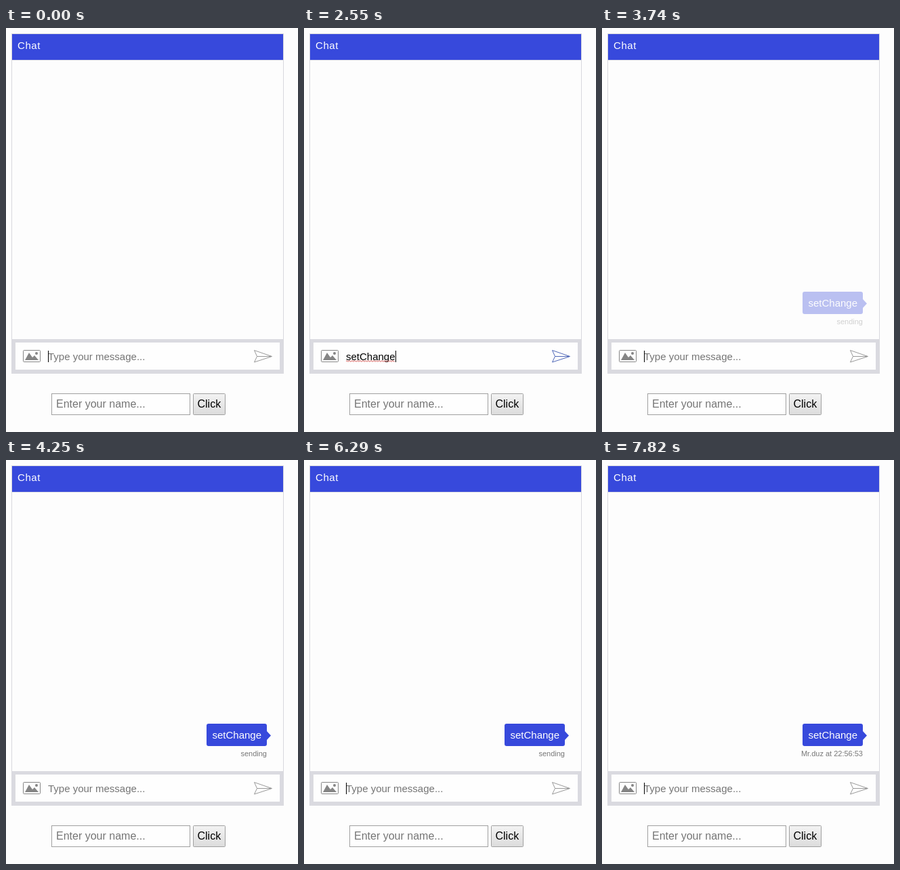
These frames come from a looping animation (431x596 px, 7.99 s). An HTML page:

```html
<!DOCTYPE html>
<html lang="en">
<head>
<meta charset="utf-8">
<title>Chat</title>
<style>
  html, body { margin: 0; width: 100%; height: 100%; overflow: hidden; background: #fdfdfd; }
  svg { display: block; width: 431px; height: 596px; font: 15px "Liberation Sans", Arial, sans-serif; }
  .line { fill: none; stroke-width: 1; }
  .hint { fill: #757575; }
  .field { font-size: 16px; }
</style>
</head>
<body>
<svg viewBox="0 0 431 596">
  <defs>
    <linearGradient id="face" x2="0" y2="1">
      <stop stop-color="#f3f3f3"/>
      <stop offset="1" stop-color="#dcdcdc"/>
    </linearGradient>
  </defs>

  <rect class="line" x="8.5" y="8.5" width="401" height="501" stroke="#d8d8de"/>
  <rect x="9" y="9" width="400" height="38" fill="#3749dc"/>
  <path class="line" d="M9 47.5H409" stroke="#dcdde6"/>
  <text x="17" y="31" fill="#fff" letter-spacing=".55">Chat</text>

  <g id="message">
    <path d="M299 389H382Q385 389 385 392V400L391 406.500 385 413V419Q385 422 382 422H299Q296 422 296 419V392Q296 389 299 389Z" fill="#3749dc"/>
    <text x="304.500" y="411" fill="#fff">setChange</text>
    <text id="status" x="385" y="437" font-size="11" text-anchor="end" fill="#777"></text>
  </g>

  <rect x="8" y="459" width="402" height="51" fill="#dadae0"/>
  <rect x="14" y="464" width="390" height="40" fill="#fefefe"/>
  <rect class="line" x="25.5" y="475.5" width="25" height="17" rx="1" stroke="#858585"/>
  <path d="M28 490L34 479 39 486 42 483 48 490Z" fill="#858585"/>
  <circle cx="45" cy="480" r="2" fill="#858585"/>
  <path id="send" class="line" d="M366.500 475.500L392.500 484.500 366.500 493 370.500 484.500ZM370.500 484.500H392" stroke-width="1"/>

  <text id="entry" x="62" y="490"></text>
  <path id="squiggle" class="line" stroke="#d8605c"/>
  <rect id="caret" x="62" y="476" width="1" height="17"/>

  <g class="field">
    <rect class="line" x="67.5" y="539.5" width="204" height="31" stroke="#a0a0a0" style="fill:#fefefe"/>
    <text class="hint" x="74" y="560">Enter your name...</text>
    <rect x="276.500" y="539.500" width="47" height="31" rx="1" fill="url(#face)" stroke="#a0a0a0"/>
    <text x="282.500" y="560">Click</text>
  </g>
</svg>
<script>
const LOOP = 7990, STEP = 170;
const WORD = "setChange";
const TYPE_START = 1600, TYPE_END = 2380, SENT = 3640, STAMPED = 6970;
const FADE = 300, BLINK = 600;

const [message, status, send, entry, squiggle, caret] =
  ["message", "status", "send", "entry", "squiggle", "caret"].map(id => document.getElementById(id));

squiggle.setAttribute("d", "M62 491.500" + "q1 -1.500 2 0t2 0".repeat(18));

const clamp = v => Math.min(1, Math.max(0, v));
const show = (el, on) => { el.style.visibility = on ? "visible" : "hidden"; };

function typedText(t) {
  if (t < TYPE_START || t >= SENT) return "";
  const progress = clamp((t - TYPE_START) / (TYPE_END - TYPE_START));
  return WORD.slice(0, 1 + Math.floor(progress * (WORD.length - 1)));
}

// The blink cycle restarts whenever the text changes.
function caretOn(t) {
  if (t >= TYPE_START && t < TYPE_END) return true;
  const origin = t >= SENT ? SENT : t >= TYPE_END ? TYPE_END : -430;
  return (t - origin) % (2 * BLINK) < BLINK;
}

function draw(t) {
  const typed = typedText(t);
  entry.textContent = typed || "Type your message...";
  entry.setAttribute("class", typed ? "" : "hint");
  caret.setAttribute("x", typed ? Math.round(62 + entry.getComputedTextLength()) : 62);
  show(caret, caretOn(t));
  show(squiggle, typed === WORD);
  send.setAttribute("stroke", typed ? "#5068b8" : "#999");
  message.setAttribute("opacity", clamp((t - SENT) / FADE));
  status.textContent = t < STAMPED ? "sending" : "Mr.duz at 22:56:53";
}

const start = performance.now();
function tick() {
  const t = (performance.now() - start) % LOOP;
  draw(Math.floor(t / STEP) * STEP);
  requestAnimationFrame(tick);
}
tick();
</script>
</body>
</html>
```
